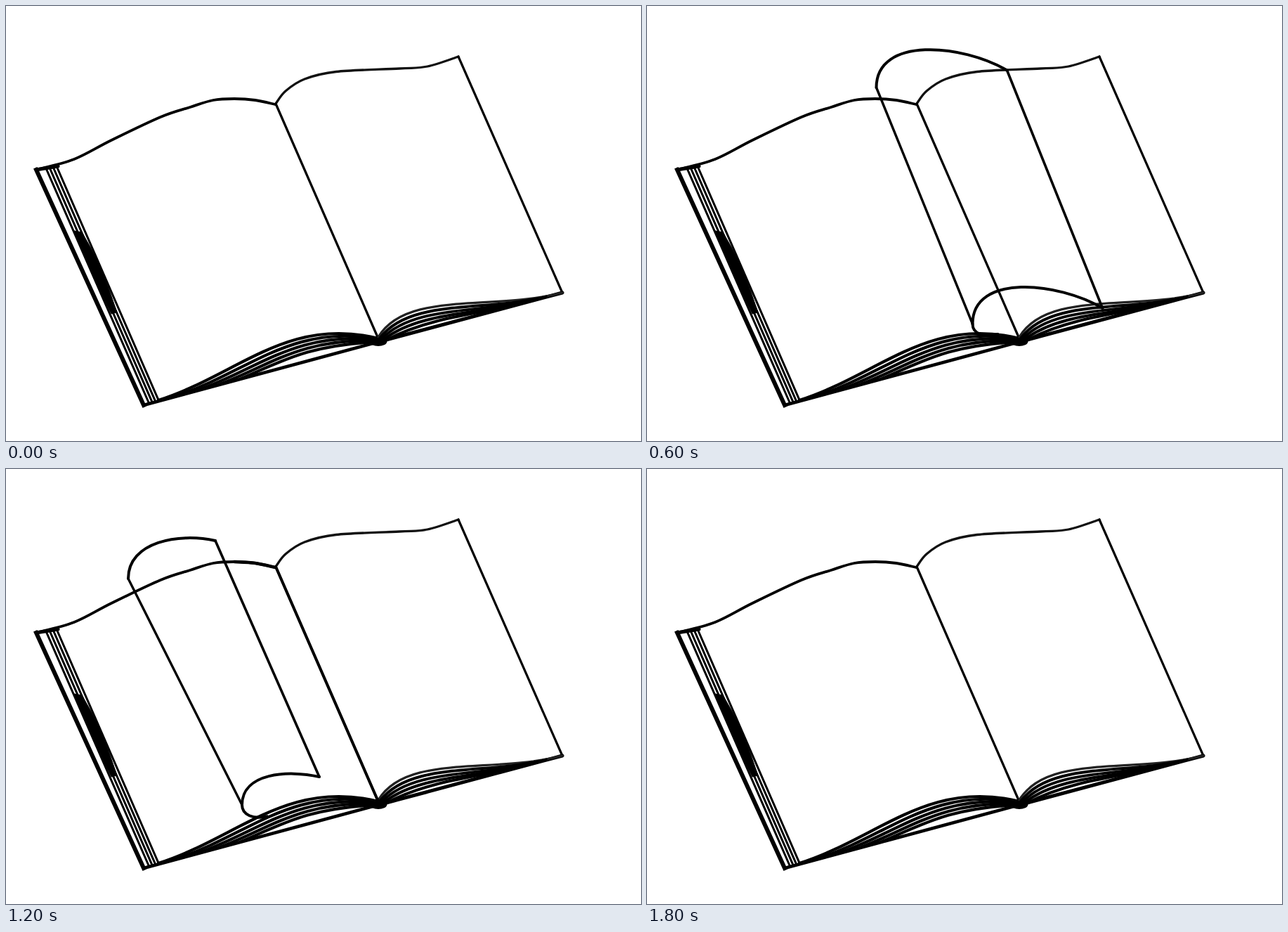
These frames come from a looping animation (904 by 619 pixels, 1900 ms). An HTML page:

```html
<!DOCTYPE html>
<html lang="en">
<head>
<meta charset="utf-8">
<title>Turning page</title>
<style>
  html, body { margin: 0; width: 100%; height: 100%; overflow: hidden; background: #fff; }
  svg { display: block; width: 904px; height: 619px; }
  path { fill: none; stroke: #000; stroke-linecap: round; stroke-linejoin: round; }
</style>
</head>
<body>
<svg viewBox="0 0 904 619">
  <g id="book"></g>
  <g id="leaf"></g>
</svg>
<script>
const STEP = 100, STEPS = 19;
const book = document.getElementById('book');
const leaf = document.getElementById('leaf');

const mix = (a, b, u) => a.map((v, i) => v + (b[i] - v) * u);
const shift = ([x, y], dx, dy) => [x + dx, y + dy];
const line = (a, b) => `M${a}L${b}`;
const bezier = (a, b, c, d) => `M${a}C${b} ${c} ${d}`;

// Smooth path through a few points
function spline(pts) {
  const at = i => pts[Math.max(0, Math.min(pts.length - 1, i))];
  let d = pts.length ? `M${pts[0]}` : '';
  for (let i = 0; i < pts.length - 1; i++) {
    const [a, b, c, e] = [at(i - 1), at(i), at(i + 1), at(i + 2)];
    const p = b.map((v, k) => v + (c[k] - a[k]) / 6);
    const q = c.map((v, k) => v - (e[k] - b[k]) / 6);
    d += `C${p} ${q} ${c}`;
  }
  return d;
}

function stroke(parent, d, width, color = '#000') {
  const p = document.createElementNS('http://www.w3.org/2000/svg', 'path');
  p.setAttribute('d', d);
  p.style.strokeWidth = width;
  p.style.stroke = color;
  parent.appendChild(p);
  return p;
}

const spineTop = [384, 139], spineFoot = [529, 471];
const coverFoot = [196, 568], rightTop = [644, 72], rightFoot = [792, 408];
const leftTop = [[43, 233], [97, 218], [150, 191], [220, 158], [262, 144],
                 [295, 134], [325, 132], [355, 134], [383, 140]];
const rightCurve = [spineTop, [398, 121], [425, 104], [470, 93.5], [560, 89], [600, 86], rightTop];

function drawBook() {
  const add = (d, w, c) => stroke(book, d, w, c);

  // Cover and binding
  add(line([43, 233], coverFoot), 6).style.strokeLinecap = 'square';
  add(line([43, 233], [74, 228]), 5);
  add(line(coverFoot, [530, 478]), 4.6);
  add(line([530, 478], rightFoot), 5);
  add('M523,477Q530,480 537,477', 11);

  // Stacked page edges with their worn patch
  for (let i = 0; i < 4; i++)
    add(line([57 + 5 * i, 231 - i], [203 + 4.6 * i, 564 - 1.3 * i]), 3);
  add('M97,320L108,322Q135,365 158,436L150,438Q118,375 97,320Z', 1).style.fill = '#000';

  add(spline(leftTop), 3.8);
  add(spline(rightCurve), 3.3, '#111');
  add(line(rightTop, rightFoot), 3.2);
  add(line(spineTop, spineFoot), 3.3);

  // Pages fan out from the spine, each starting further along the cover
  for (let i = 0; i < 5; i++) {
    const u = i / 4;
    add(bezier(mix([217, 561], [335, 530], u), mix([330, 525], [390, 507], u),
               mix([400, 441], [430, 482], u), mix([530, 473], [528, 478], u)), 4.2);
    add(bezier(mix([530, 471], [540, 476], u), mix([570, 405], [590, 449], u),
               mix([690, 434], [650, 440], u), mix(rightFoot, [700, 431], u)),
        i ? 4 : 3.2, i ? '#000' : '#222');
  }
}

// Paths of the leaf's corners: one point for each key step
const keys = [0, 4, 8, 10, 12, 14, 18];
const foldTop  = [[384, 139], [350, 112], [303, 120], [245, 142], [174, 156], [138, 205], [35, 234]];
const edgeTop  = [[648, 72], [555, 92], [470, 91], [397, 121], [298, 102], [193, 144], [72, 228]];
const foldFoot = [[532, 466], [498, 447], [429, 458], [388, 470], [336, 478], [300, 502], [232, 540]];
const edgeFoot = [[796, 409], [700, 421], [597, 439], [541, 459], [446, 438], [361, 474], [250, 546]];

function along(track, s) {
  const i = keys.findIndex(k => k > s) - 1;
  return mix(track[i], track[i + 1], (s - keys[i]) / (keys[i + 1] - keys[i]));
}

// Bent border of the leaf: rises at the fold, tilts at the free edge
function arc(fold, edge, s) {
  const bend = 0.39 * Math.hypot(edge[0] - fold[0], edge[1] - fold[1]);
  const tilt = Math.max(-25, 45 - 2.5 * (s - 8.4) ** 2) * Math.PI / 180;
  return bezier(fold, shift(fold, 0, -bend * Math.min(1, s / 3)),
    shift(edge, -bend * Math.cos(tilt), -bend * Math.sin(tilt)), edge);
}

// Curl under the fold, back to the page below
function hook(fold) {
  const x = Math.min(fold[0] + 36, 528);
  const y = 467 + 0.48 * (Math.hypot(Math.max(0, 460 - x), 40) - 40);
  return bezier(fold, shift(fold, 0, 14), [x - 20, y + 5], [x, y]);
}

const parts = [4, 4, 4, 3.4, 3.6, 4, 4.5].map(w => stroke(leaf, '', w));

function render(s) {
  const turning = s > 0 && s < STEPS - 1;
  leaf.style.display = turning ? '' : 'none';
  if (!turning) return;
  const [ft, et, ff, ef] = [foldTop, edgeTop, foldFoot, edgeFoot].map(t => along(t, s));
  const settled = leftTop.filter(p => p[0] > et[0]);
  [
    arc(ft, et, s), arc(ff, ef, s), hook(ff), line(ft, ff), line(et, ef),
    settled.length ? line(spineTop, spineFoot) : '', spline(settled)
  ].forEach((d, i) => parts[i].setAttribute('d', d));
}

drawBook();
const start = performance.now();
let shown = -1;
function tick() {
  const s = Math.floor((performance.now() - start) / STEP) % STEPS;
  if (s !== shown) render(shown = s);
  requestAnimationFrame(tick);
}
tick();
</script>
</body>
</html>
```
